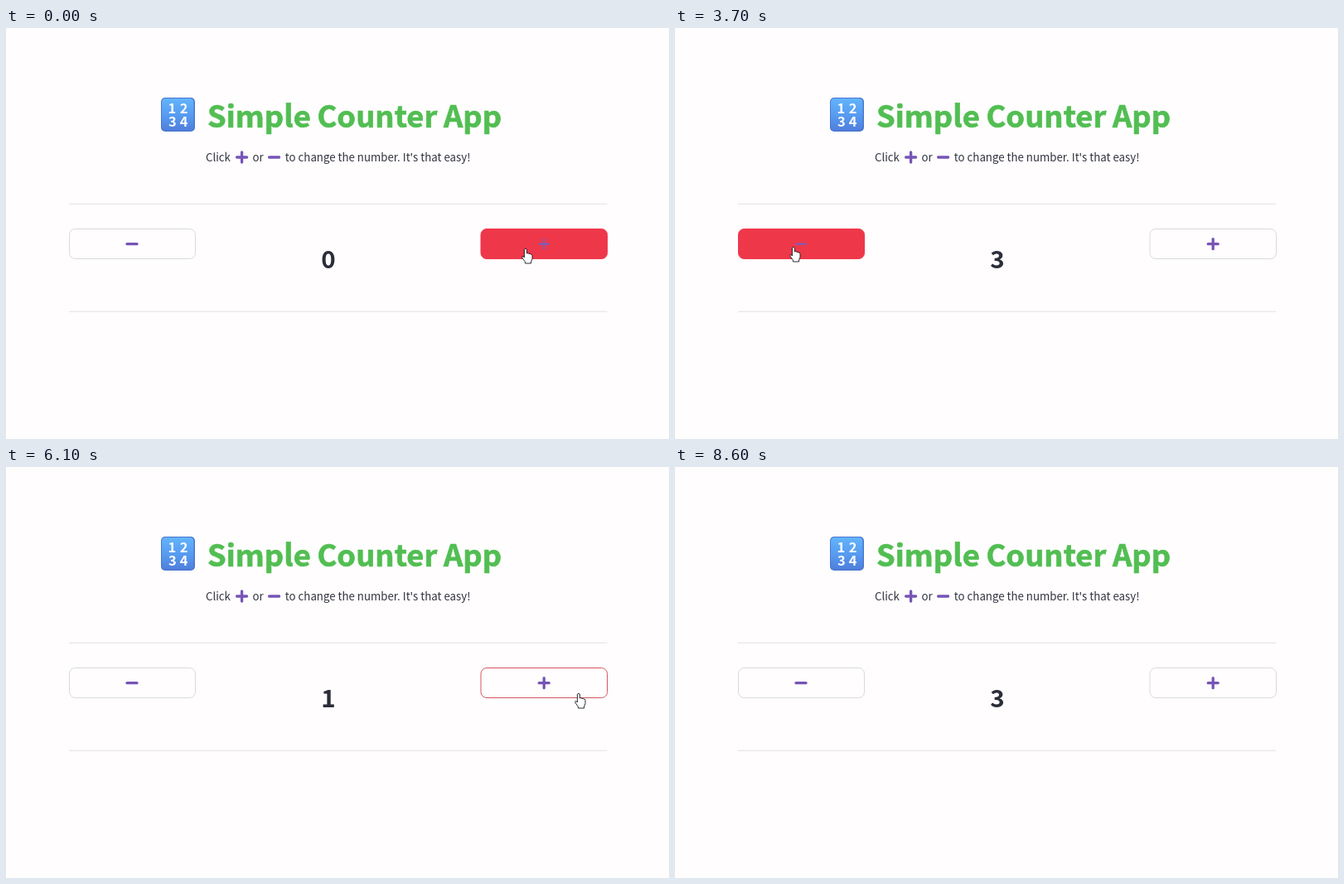
An HTML page that plays this animation: 800 by 496 pixels, repeating every 8.7 s.

```html
<!DOCTYPE html>
<html lang="en">
<head>
<meta charset="utf-8">
<title>Counter</title>
<style>
  html, body { margin: 0; height: 100%; overflow: hidden; background: #fffdfe; }
  svg { display: block; width: 100vw; height: 100vh; }
  text { font-family: "Noto Sans CJK JP", "Noto Sans CJK SC", "Noto Sans CJK", "Noto Sans", sans-serif; fill: #31333f; }
  .title { font-size: 36.4px; font-weight: 700; fill: #52be52; stroke: #52be52; stroke-width: .7; }
  .body { font-size: 13.25px; }
  .count { font-size: 29.6px; font-weight: 700; fill: #2b2d39; text-anchor: middle; }
  .tile text { font-size: 16.5px; font-weight: 700; fill: #fff; text-anchor: middle; }
  .rule { stroke: #e0e0e4; }
  .sign { stroke: #7654b6; stroke-width: 3.3; stroke-linecap: round; fill: none; }
  .button rect { fill: #fffdfe; stroke: #d9dade; }
  .button.hover rect { stroke: #d2555f; }
  .button.active rect { fill: #ef374a; stroke: #ef374a; }
  .button.active .sign { stroke: #7660bd; stroke-width: 2; }
</style>
</head>
<body>
<svg viewBox="0 0 800 496">
  <defs>
    <linearGradient id="blue" x2="0" y2="1">
      <stop offset="0" stop-color="#62b4fb"/>
      <stop offset=".55" stop-color="#579af0"/>
      <stop offset="1" stop-color="#4f7fdc"/>
    </linearGradient>
  </defs>

  <g class="tile">
    <rect x="187" y="84" width="41" height="41" rx="5" fill="#4a78cf"/>
    <rect x="188" y="85" width="38.5" height="38.5" rx="4.5" fill="url(#blue)"/>
    <text x="200.3" y="102.5">1</text>
    <text x="214.5" y="102.5">2</text>
    <text x="200.8" y="118.5">3</text>
    <text x="214.5" y="118.5">4</text>
  </g>

  <text class="title" y="120"><tspan x="243">Simple</tspan> <tspan x="375.5">Counter</tspan> <tspan x="528">App</tspan></text>

  <text class="body" y="161"><tspan x="241">Click</tspan> <tspan x="297.5">or</tspan> <tspan x="336.8">to change the number. It's that easy!</tspan></text>
  <path class="sign" d="M278.6 156h12M284.6 150v12M317.6 156h12"/>

  <path class="rule" d="M76 212.2H725.5M76 342.2H725.5"/>

  <g class="button" id="minus">
    <rect x="76.5" y="242.5" width="152" height="36" rx="7"/>
    <path class="sign" d="M146 260.7h12"/>
  </g>
  <g class="button" id="plus">
    <rect x="573" y="242.5" width="152.5" height="36" rx="7"/>
    <path class="sign" d="M643.2 260.7h12M649.2 254.7v12"/>
  </g>

  <text class="count" id="count" x="389" y="289.5">0</text>

  <path id="hand" fill="#fff" stroke="#15151a" stroke-width=".9" stroke-linejoin="round"
    d="M-1.6 1.2Q0-.9 1.4 1.2V6Q3 5 4 6.4Q5.6 5.6 6.2 7.2Q8 6.8 8 8.6V12.5L6.6 16V18H-.6V16.2L-4 11.6Q-4.8 9.6-3.2 9.4L-1.6 11Z"/>
</svg>

<script>
const LOOP = 8700;
const HIDE_AT = 8400;
const PRESS_TIME = 200;
const COUNT_DELAY = 300;

const clicks = [
  { at: 0, step: 1 }, { at: 1200, step: 1 }, { at: 2300, step: 1 },
  { at: 3600, step: -1 }, { at: 4500, step: -1 },
  { at: 6800, step: 1 }, { at: 7500, step: 1 }
];

// Pointer stops: time, x, y
const path = [
  [0, 627, 266], [2500, 627, 266], [2700, 600, 291], [2800, 540, 291],
  [3400, 143, 264], [5000, 143, 264], [5400, 191, 268],
  [6100, 691, 273], [LOOP, 691, 273]
];

const byId = id => document.getElementById(id);
const hand = byId("hand"), count = byId("count");
const buttons = [
  { node: byId("minus"), left: 76, right: 229, step: -1 },
  { node: byId("plus"), left: 572, right: 726, step: 1 }
];

const ease = k => k * k * (3 - 2 * k);

function pointerAt(t) {
  const i = path.findIndex(stop => stop[0] > t);
  const [t0, x0, y0] = path[i - 1], [t1, x1, y1] = path[i];
  const k = ease((t - t0) / (t1 - t0));
  return [x0 + (x1 - x0) * k, y0 + (y1 - y0) * k];
}

function draw(t) {
  const [x, y] = pointerAt(t);
  const visible = t < HIDE_AT;
  const pressed = clicks.find(c => t >= c.at && t < c.at + PRESS_TIME);

  for (const { node, left, right, step } of buttons) {
    const hover = visible && x > left && x < right && y > 242 && y < 279;
    node.classList.toggle("hover", hover);
    node.classList.toggle("active", hover && pressed?.step === step);
  }

  count.textContent = clicks
    .filter(c => t >= c.at + COUNT_DELAY)
    .reduce((sum, c) => sum + c.step, 0);
  hand.setAttribute("transform", `translate(${x} ${y})`);
  hand.setAttribute("visibility", visible ? "visible" : "hidden");
}

const start = performance.now();
function tick() {
  draw((performance.now() - start) % LOOP);
  requestAnimationFrame(tick);
}
tick();
</script>
</body>
</html>
```
